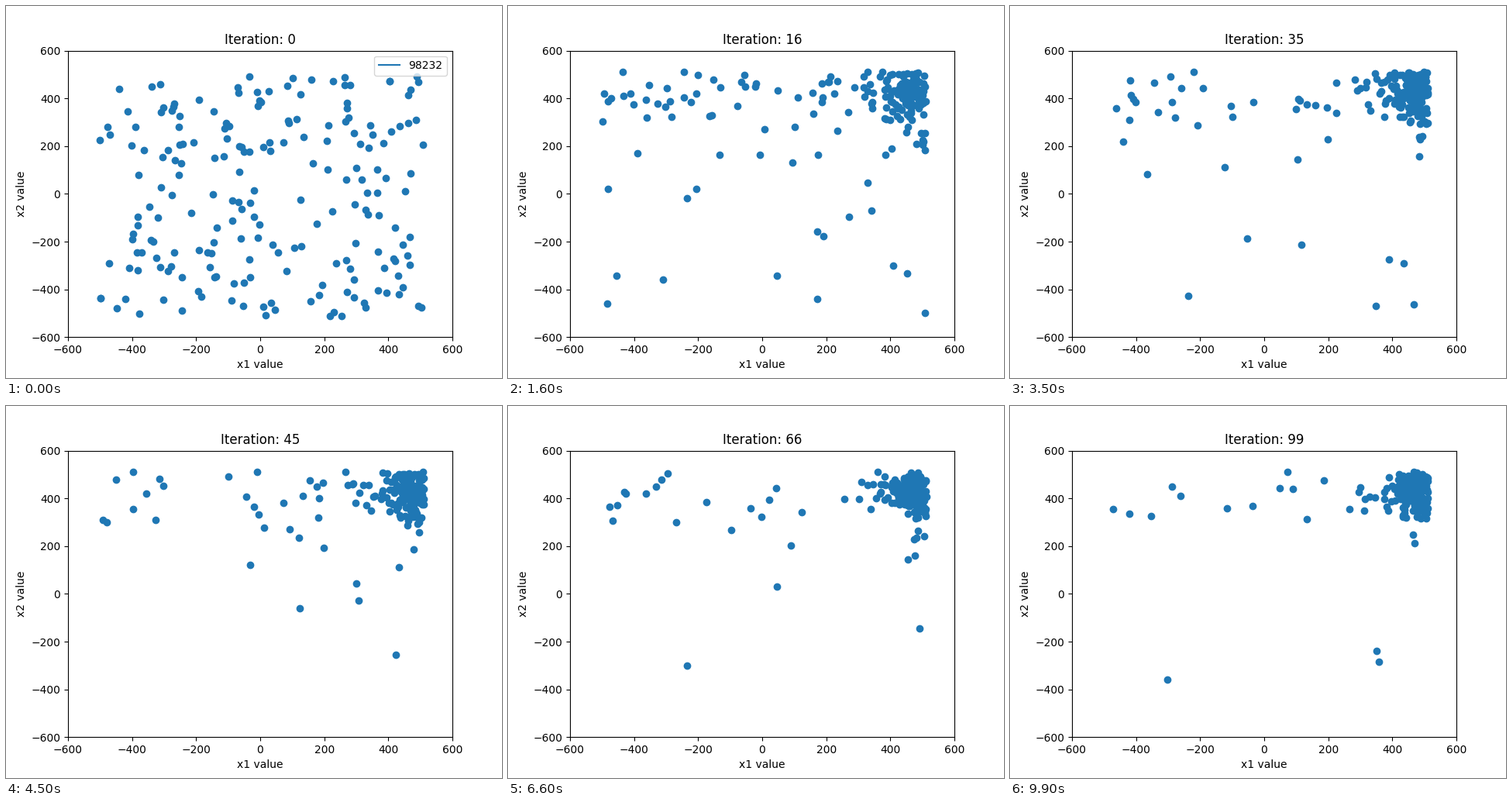
A matplotlib script for the animation above (10 s loop, 640 by 480 pixels).

```python
import numpy as np
import matplotlib.pyplot as plt
from matplotlib.animation import FuncAnimation

POP, GENERATIONS, LIMIT = 200, 100, 512


def decay(gen, floor, extra, span):
    return floor + extra * np.exp(-gen / span)


def fold(values):
    """Reflect values back below the search limit."""
    return LIMIT - np.abs(LIMIT - values)


def population(gen):
    """Random start that settles around the optimum near (470, 425)."""
    rng = np.random.default_rng(98232 + gen)

    # Strays fill the whole square at first, then lean towards high x2.
    strays = round(POP / (1 + gen / 3.5))
    rest = POP - strays
    lean = decay(gen, 1.8, -0.8, 4)
    loose = np.c_[rng.uniform(-LIMIT, LIMIT, strays),
                  LIMIT - 2 * LIMIT * rng.random(strays) ** lean]

    def size(*curve):
        return round(decay(gen, *curve) * rest / POP)

    band, column, fringe = size(8, 60, 25), size(4, 28, 22), size(16, 44, 45)
    core = rest - band - column - fringe

    left = np.c_[rng.uniform(-500, 240, band), rng.normal(405, 62, band)]
    below = np.c_[rng.normal(465, decay(gen, 15, 60, 30), column),
                  rng.triangular(100, 335, 335, column)]
    side = np.c_[rng.triangular(240, 440, 440, fringe),
                 rng.normal(425, 48, fringe)]
    best = np.c_[rng.normal(470, 25, core), rng.normal(425, 50, core)]
    return fold(np.vstack([loose, left, below, side, best]))


fig, ax = plt.subplots(figsize=(6.4, 4.8), dpi=100)
ax.set(xlim=(-600, 600), ylim=(-600, 600),
       xlabel="x1 value", ylabel="x2 value")
title = ax.set_title("Iteration: 0")
dots = ax.scatter(*population(0).T, color="C0")
ax.plot([], [], color="C0", label="98232")
legend = ax.legend(loc="upper right")


def draw(gen):
    title.set_text(f"Iteration: {gen}")
    dots.set_offsets(population(gen))
    legend.set_visible(gen == 0)
    return title, dots, legend


anim = FuncAnimation(fig, draw, frames=GENERATIONS, interval=100,
                     repeat=True, repeat_delay=0)
plt.show()
```
